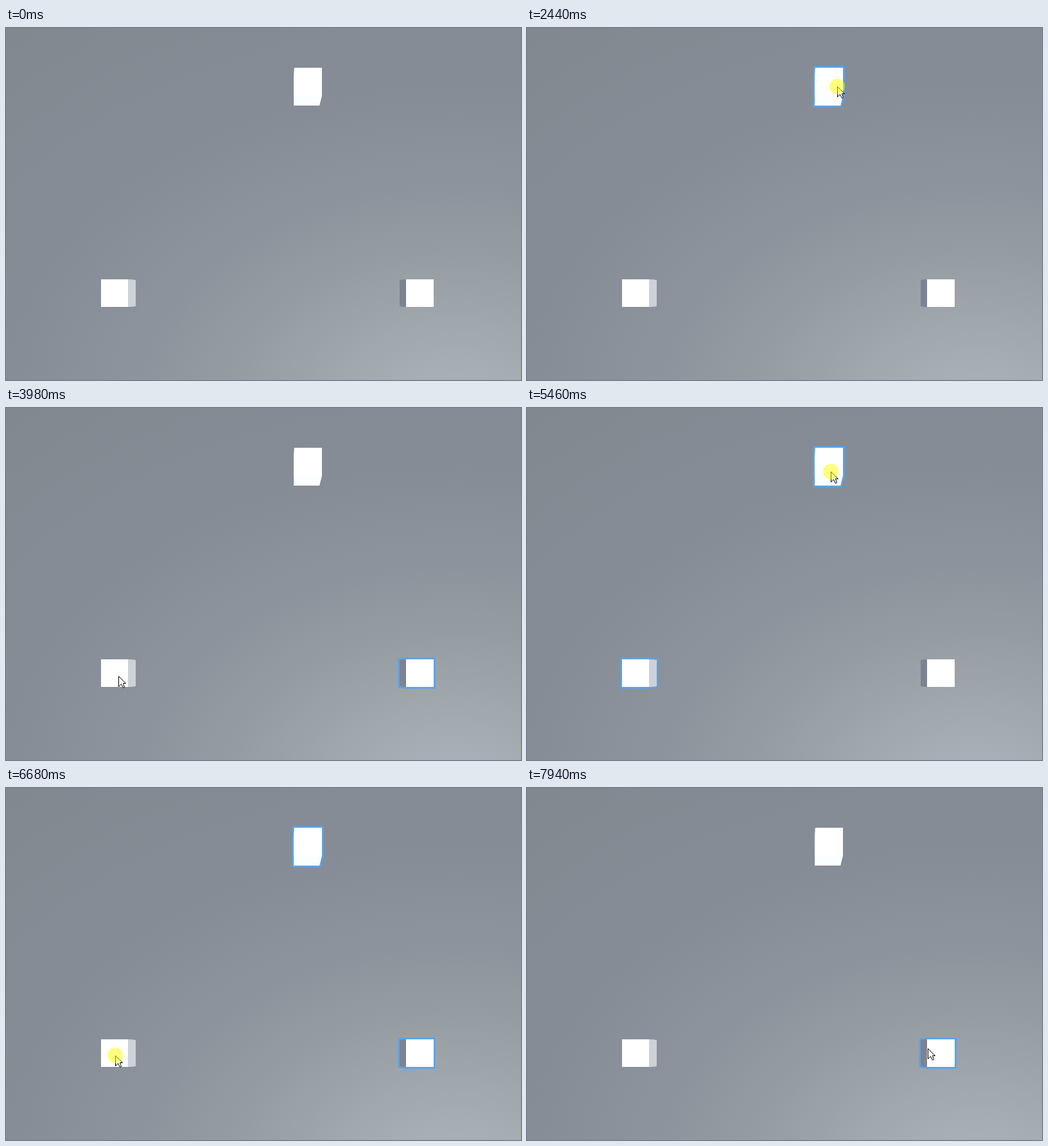
Write an HTML page with a canvas that moves like this. It is 802 by 549 pixels and loops after 7990 ms.

```html
<!DOCTYPE html>
<html>
<head>
<meta charset="utf-8">
<style>
html, body { margin: 0; width: 100%; height: 100%; overflow: hidden; }
body {
  background: radial-gradient(1086px 776px at 700px 600px, #adb3ba, #a9afb6 6.6%, #9fa7ac 19%,
    #959da2 32%, #8d949d 45%, #868d96 64%, #818890);
}
canvas { display: block; }
</style>
</head>
<body>
<canvas id="stage" width="802" height="549"></canvas>
<script>
const ctx = document.getElementById('stage').getContext('2d');
const LOOP = 7990, PRESS = 90;

// front faces; the back faces shrink towards the vanishing point
const VANISH = { x: 420, y: 413.5, scale: .949 };
const TOP = { x: 449, y: 62, w: 43, shade: '#fafeff' };
const LEFT = { x: 148, y: 392, w: 42, shade: '#cdd2d8' };
const RIGHT = { x: 623, y: 392, w: 43, shade: '#7c8492' };
const cubes = [TOP, LEFT, RIGHT];
const HEIGHT = 43;

// pointer stops: arrival, x, y, departure, clicked cube
const stops = [
  [860, 439, 536, 860],
  [1240, 170, 357, 1240],
  [1540, 172, 412, 1760, LEFT],
  [2370, 483, 91, 2485, TOP],
  [3160, 642, 413, 3400, RIGHT],
  [3980, 175, 418, 4120, LEFT],
  [4750, 482, 77, 4860],
  [4940, 473, 99, 5550, TOP],
  [5950, 638, 413, 6100, RIGHT],
  [6640, 170, 417, 6770, LEFT],
  [7200, 473, 93, 7370, TOP],
  [7940, 624, 406, LOOP]
];
const clicks = stops.filter(s => s[4]).map(s => ({ time: s[3] - PRESS, cube: s[4] }));
const TOGGLE_FROM = 5000; // later clicks add or remove

const arrow = [[0, 0], [0, 16], [4, 12], [7, 18], [9, 17], [7, 11], [11, 11]];

function selectionAt(t) {
  let chosen = [];
  for (const { time, cube } of clicks) {
    if (time > t) break;
    if (time < TOGGLE_FROM) chosen = [cube];
    else if (chosen.includes(cube)) chosen = chosen.filter(c => c !== cube);
    else chosen.push(cube);
  }
  return chosen;
}

function pointerAt(t) {
  const i = stops.findLastIndex(s => s[0] <= t);
  const [, x, y, leave] = stops[i];
  const [arrive, nx, ny] = stops[i + 1] || [LOOP + 1, x, y];
  const u = Math.max(0, (t - leave) / (arrive - leave));
  const s = u * u * (3 - 2 * u);
  return [Math.round(x + (nx - x) * s), Math.round(y + (ny - y) * s)];
}

function trace(pts, x = 0, y = 0) {
  ctx.beginPath();
  for (const [px, py] of pts) ctx.lineTo(px + x, py + y);
  ctx.closePath();
}

function fill(color) {
  ctx.fillStyle = color;
  ctx.fill();
}

function stroke(color, width) {
  ctx.strokeStyle = color;
  ctx.lineWidth = width;
  ctx.stroke();
}

function drawCube({ x, y, w, shade }, selected) {
  const recede = (v, axis) => Math.round(VANISH[axis] + (v - VANISH[axis]) * VANISH.scale);
  const front = [[x, y], [x + w, y], [x + w, y + HEIGHT], [x, y + HEIGHT]];
  const back = front.map(([px, py]) => [recede(px, 'x'), recede(py, 'y')]);
  const sides = front.map((p, i) => {
    const j = (i + 1) % 4;
    return [p, front[j], back[j], back[i]];
  });
  if (selected) for (const face of [front, ...sides]) {
    trace(face);
    stroke('#5ba3e8', 5);
  }
  for (const face of sides) {
    trace(face);
    fill(shade);
  }
  trace(front);
  fill('#fff');
}

function drawPointer(t) {
  const [x, y] = pointerAt(t);
  trace(arrow, x + .5, y + .5);
  fill('#fff');
  stroke('#000', 1);
  if (clicks.some(c => t >= c.time && t < c.time + PRESS)) {
    ctx.beginPath();
    ctx.arc(x, y, 12, 0, 2 * Math.PI);
    fill('rgba(255,255,0,.5)');
  }
}

ctx.miterLimit = 2;
const start = performance.now();
function frame() {
  const t = (performance.now() - start) % LOOP;
  const chosen = selectionAt(t);
  ctx.clearRect(0, 0, 802, 549);
  for (const cube of cubes) drawCube(cube, chosen.includes(cube));
  if (t >= stops[0][0]) drawPointer(t);
  requestAnimationFrame(frame);
}
frame();
</script>
</body>
</html>
```
